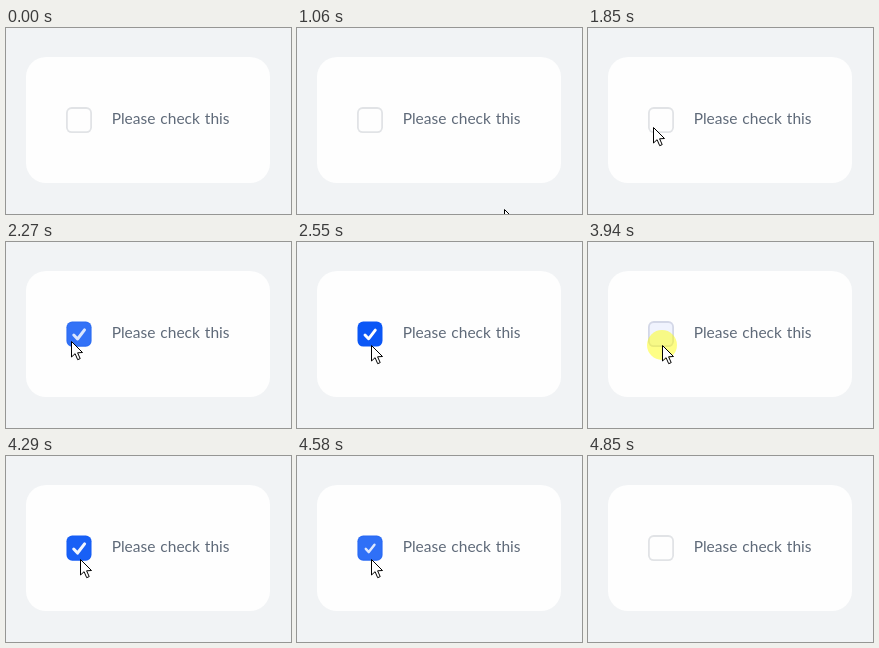
An HTML page with a canvas that plays this animation: 285x186 px, repeating every 5.46 s.

```html
<!DOCTYPE html>
<html lang="en">
<head>
<meta charset="utf-8">
<title>Checkbox</title>
<style>
  html, body { margin: 0; width: 100%; height: 100%; overflow: hidden; background: #f1f3f5; }
  canvas { display: block; width: 285px; height: 186px; }
</style>
</head>
<body>
<canvas id="stage" width="285" height="186"></canvas>
<script>
const ctx = document.getElementById('stage').getContext('2d');
const LOOP = 5460;
const ENTER = 1060;
const STEP = 46.2; // motion advances in steps, like a screen capture

const WHITE = [254, 254, 254];
const LAVENDER = [240, 243, 254];
const GREY = [225, 227, 230];
const GREY_BLUE = [211, 215, 231];
const BLUE = [11, 87, 246];

const clamp = v => Math.min(1, Math.max(0, v));
const span = (t, from, to) => clamp((t - from) / (to - from));
const lerp = (a, b, k) => a + (b - a) * k;
const easeOut = k => 1 - (1 - k) ** 2;
const easeInOut = k => k * k * (3 - 2 * k);
const backOut = k => 1 + 2.2 * (k - 1) ** 3 + 1.2 * (k - 1) ** 2;
const mix = (a, b, k) => a.map((v, i) => lerp(v, b[i], k));
const css = c => `rgb(${c.map(Math.round).join(',')})`;
const stepped = t => ENTER + Math.floor((t - ENTER) / STEP) * STEP;

// Pointer moves: start, end, from, to, easing
const moves = [
  [ENTER, 1430, [207, 181], [64, 87], easeOut],
  [1580, 1845, [64, 87], [65, 99], easeInOut],
  [2290, 2540, [65, 99], [74, 103], easeInOut],
  [4600, 4845, [74, 103], [180, 189], k => k ** 1.5]
];
const presses = [[1980, 2120], [2840, 2980], [3940, 4080], [4480, 4526]];

function pointerAt(t) {
  const move = moves.filter(m => t >= m[0]).pop();
  if (!move) return null;
  const [start, end, from, to, ease] = move;
  const k = ease(span(t, start, end));
  return from.map((v, i) => Math.round(lerp(v, to[i], k)));
}

function roundRect(x, y, w, h, r, color) {
  ctx.beginPath();
  ctx.roundRect(x, y, w, h, r);
  ctx.fillStyle = color;
  ctx.fill();
}

function tracePath(points) {
  ctx.beginPath();
  points.forEach(([x, y]) => ctx.lineTo(x, y));
}

function drawCheckbox(t) {
  const first = span(t, 2100, 2320) - span(t, 2960, 3150);
  const second = span(t, 4060, 4280) - span(t, 4526, 4706);
  const checked = easeInOut(first + second);
  const touched = t < 2100 ? 0 : 1 - span(t, 4690, 4840);
  const border = mix(mix(GREY, GREY_BLUE, touched), BLUE, checked);
  const fill = mix(mix(WHITE, LAVENDER, touched), BLUE, checked);
  const inset = 0.5 * checked;

  roundRect(60 + inset, 79.1 + inset, 26 - 2 * inset, 26 - 2 * inset, 5.8, css(border));
  roundRect(61.8, 80.9, 22.4, 22.4, 4, css(fill));

  const falling = (t >= 2960 && t < 4060) || t >= 4526;
  const rising = t < 2960 ? span(t, 2120, 2380) : span(t, 4080, 4340);
  const scale = falling ? checked : backOut(rising);
  if (checked <= 0 || scale <= 0) return;
  ctx.save();
  ctx.globalAlpha = checked;
  ctx.translate(73, 92.3);
  ctx.scale(scale, scale);
  tracePath([[-5, 0.7], [-1.4, 4.5], [5.3, -4.2]]);
  ctx.strokeStyle = '#fff';
  ctx.lineWidth = 2.9;
  ctx.lineCap = ctx.lineJoin = 'round';
  ctx.stroke();
  ctx.restore();
}

function drawPointer(t, pressed) {
  const pos = pointerAt(t);
  if (!pos) return;
  ctx.save();
  ctx.translate(...pos);
  if (pressed) {
    ctx.beginPath();
    ctx.arc(0, 0, 15, 0, Math.PI * 2);
    ctx.fillStyle = 'rgba(255,255,0,0.47)';
    ctx.fill();
  }
  ctx.translate(0.5, 0.5);
  tracePath([[0, 0], [0, 15.5], [3.6, 12.2], [6.2, 18.2], [8.7, 17.1], [6.1, 11.3], [11, 11]]);
  ctx.closePath();
  ctx.fillStyle = '#fff';
  ctx.fill();
  ctx.strokeStyle = '#000';
  ctx.lineWidth = 1;
  ctx.lineJoin = 'round';
  ctx.stroke();
  ctx.restore();
}

function draw(time) {
  const t = stepped(time);
  ctx.fillStyle = '#f1f3f5';
  ctx.fillRect(0, 0, 285, 186);
  roundRect(20, 29, 244, 126, 20, css(WHITE));
  ctx.font = '15.5px Lato, "Open Sans", sans-serif';
  ctx.wordSpacing = '1px';
  ctx.fillStyle = '#5f6a79';
  ctx.fillText('Please check this', 105.7, 96.4);
  drawCheckbox(t);
  drawPointer(t, presses.some(([down, up]) => time >= down && time < up));
}

const start = performance.now();
function tick() {
  draw((performance.now() - start) % LOOP);
  requestAnimationFrame(tick);
}
tick();
</script>
</body>
</html>
```
